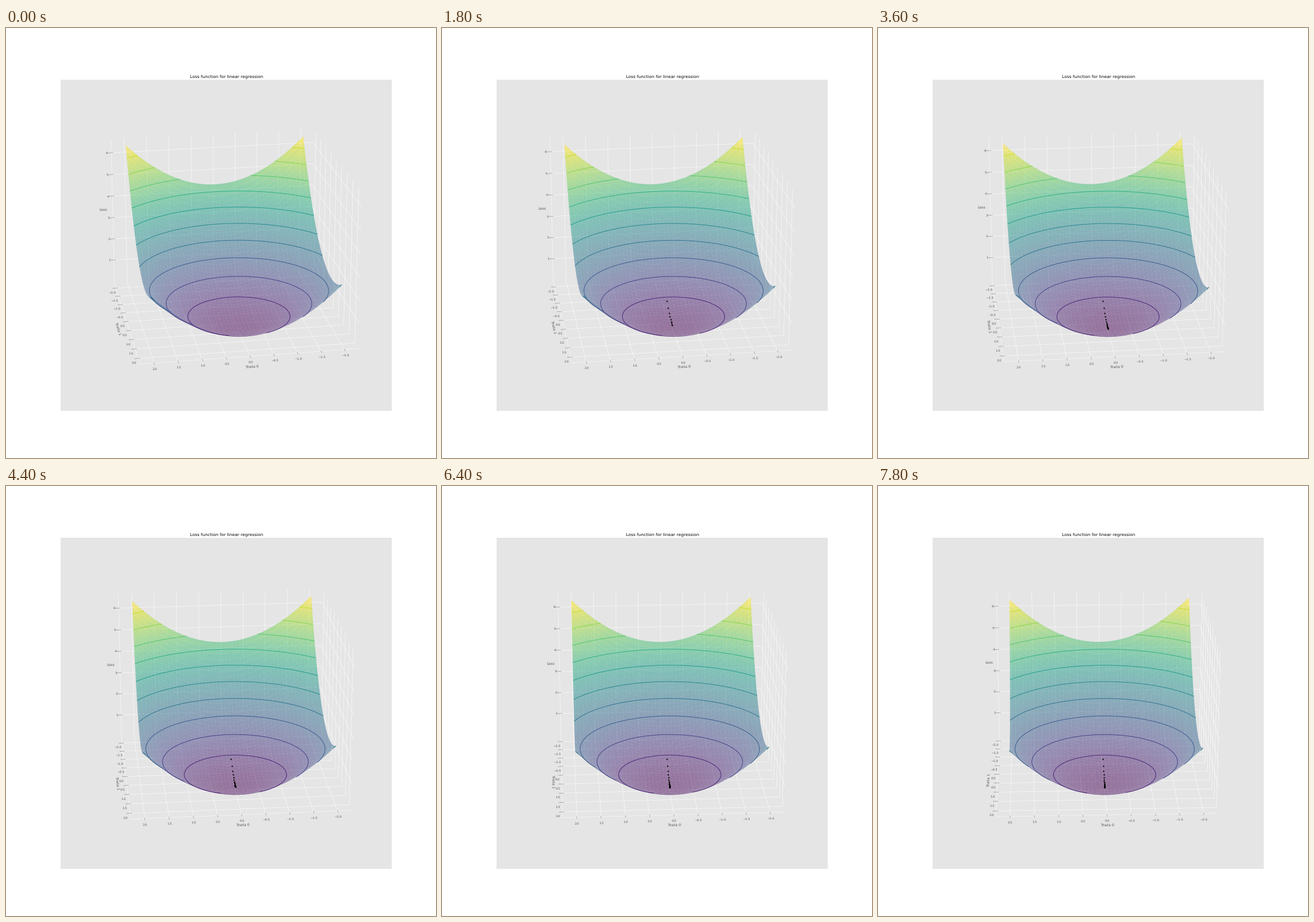
Animation of 748 by 748 pixels, one loop 8000 ms. Source, as a matplotlib script:

```python
import numpy as np
import matplotlib.pyplot as plt
from matplotlib.animation import FuncAnimation

FRAMES, STEP_MS = 40, 200
CORR = 0.99          # slope of the standardised data, where the loss is lowest
RATE = 0.19          # gradient descent learning rate
EDGE = 2.2917        # half width of the plot box

plt.style.use("ggplot")
plt.rcParams.update({
    "font.family": "DejaVu Sans",
    "text.hinting": "none",
    "grid.linewidth": 1.1,
})


def loss(t0, t1):
    return 0.5 * (t0 ** 2 + t1 ** 2 - 2 * CORR * t1 + 1)


fig = plt.figure(figsize=(20, 20), dpi=37.4, facecolor="white")
ax = fig.add_subplot(projection="3d", computed_zorder=False)
ax.set_title("Loss function for linear regression")
ax.set(xlabel="Theta 0", ylabel="Theta 1", zlabel="Loss")
ax.set_box_aspect((4, 4, 3))

side = np.linspace(-2, 2, 100)
t0, t1 = np.meshgrid(side, side)
z = loss(t0, t1)
ax.plot_surface(t0, t1, z, cmap="viridis", alpha=0.5, linewidth=0,
                edgecolor="none", antialiased=True, zorder=1)
ax.contour(t0, t1, z, levels=np.arange(0, 6.7, 0.6), cmap="viridis",
           linewidths=1.8, zorder=2)

ax.set(xlim=(-EDGE, EDGE), ylim=(-EDGE, EDGE), zlim=(-0.13, 6.62))
ticks = np.arange(-2, 2.1, 0.5)
ax.set(xticks=ticks, yticks=ticks, zticks=range(1, 7))
for axis in (ax.xaxis, ax.yaxis, ax.zaxis):
    axis.set_pane_color((1, 1, 1, 0))

path = CORR * (1 - (1 - RATE) ** np.arange(FRAMES))
dots, = ax.plot([], [], [], "o", color="black", markersize=4.5,
                markeredgewidth=0, zorder=3)


def draw(i):
    seen = path[:i]
    dots.set_data_3d(0 * seen, seen, loss(0, seen))
    ax.view_init(elev=20, azim=80 + 0.2 * i)
    return dots,


anim = FuncAnimation(fig, draw, frames=FRAMES, interval=STEP_MS,
                     init_func=lambda: draw(0), repeat=True, repeat_delay=0)
plt.show()
```
